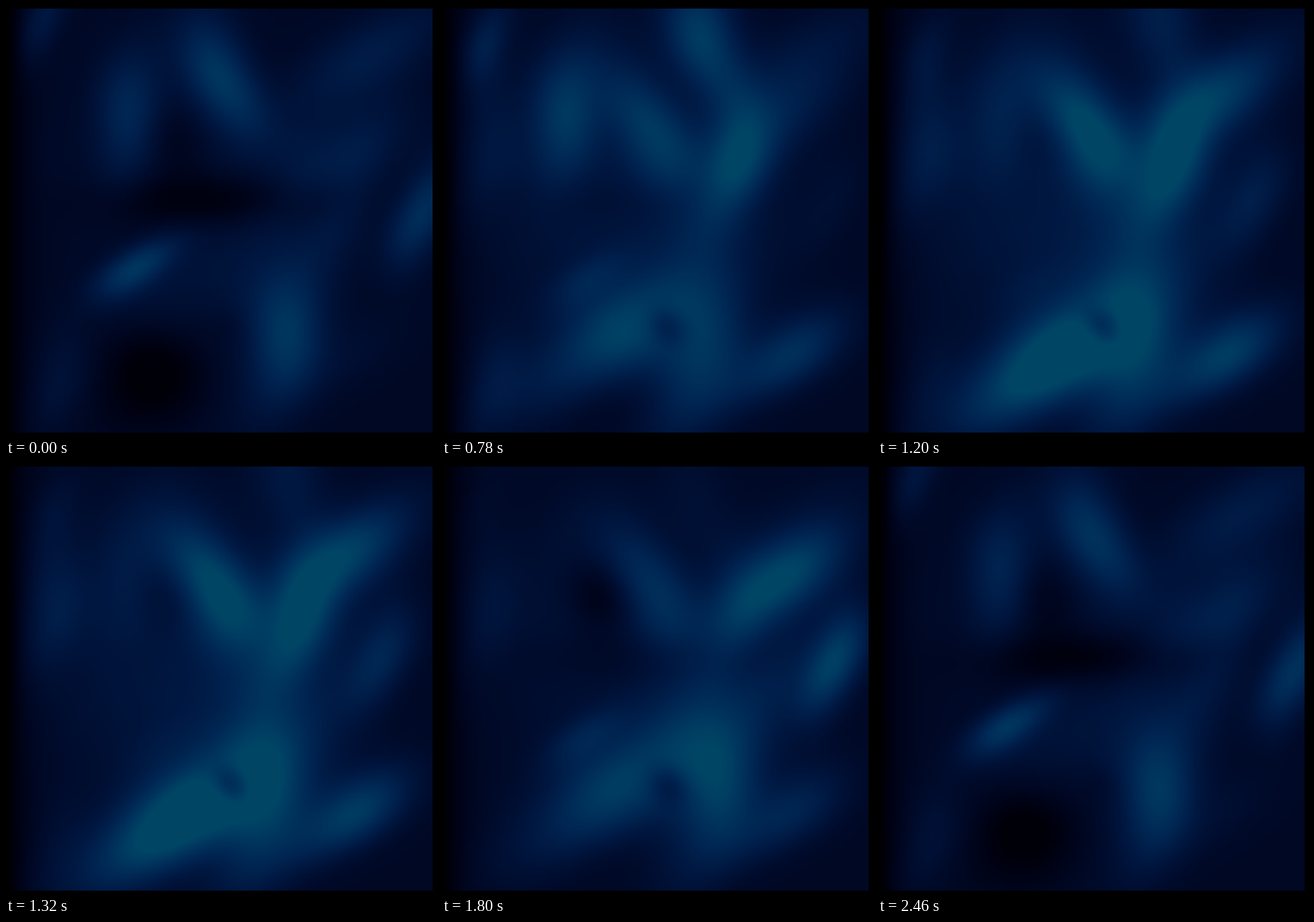
These frames come from a looping animation (500 by 500 pixels, 2520 ms). An HTML page with a canvas:

```html
<!DOCTYPE html>
<html lang="en">
<head>
<meta charset="utf-8">
<title>Deep blue drift</title>
<style>
html, body { margin: 0; width: 100%; height: 100%; overflow: hidden; background: #000; }
canvas { position: absolute; left: 4px; top: 3px; width: 492px; height: 493px; }
</style>
</head>
<body>
<canvas id="view" width="123" height="123"></canvas>
<script>
const LOOP = 2520, STEP = 60, SIZE = 123, CELL = 4;
const BASE = 0.2, REST = 0.12;
const ctx = document.getElementById('view').getContext('2d');
const image = ctx.createImageData(SIZE, SIZE);
const field = new Float32Array(SIZE * SIZE);
const lights = [];

const wave = phase => Math.cos(2 * Math.PI * phase);
const mix = (a, b, k) => a + (b - a) * k;

// Makes a family of soft ellipses that share the tilt of the long axis and the width ratio.
// Each pulses once per loop, strongest at phase `peak`, and sways by (dx, dy).
function family(tilt, ratio) {
  const a = tilt * Math.PI / 180;
  return (x, y, length, glow, peak, dx = 0, dy = 0) => lights.push({
    x, y, length, width: length * ratio, glow, peak, dx, dy,
    cos: Math.cos(a), sin: Math.sin(a)
  });
}
const rising = family(-33, 0.42);
const upright = family(-74, 0.5);
const leaning = family(65, 0.5);
const round = family(0, 1);
const flat = family(0, 0.24);

leaning(295, 48, 76, 0.76, 0.17, -38, 34);
leaning(240, 145, 86, 0.7, 0.5);

rising(430, 60, 100, 0.32, 0.08);
rising(400, 135, 86, 0.75, 0.65, 0, 30);
rising(400, 405, 78, 0.65, 0.47);
rising(170, 315, 54, 0.55, 0, -12, -10);
rising(190, 375, 112, 1, 0.5, 0, -40);

upright(52, 40, 50, 0.45, 0.18, -10, -20);
upright(143, 125, 76, 0.62, 0.18);
upright(45, 170, 78, 0.3, 0.5);
upright(335, 185, 76, 0.7, 0.42);
upright(458, 232, 64, 0.75, 0.8, 25, 8);
upright(392, 240, 74, 0.24, 0.85);
upright(325, 388, 78, 0.52, 0.92);
upright(288, 415, 95, 0.5, 0.42);
upright(50, 440, 66, 0.26, 0.2);

round(215, 225, 165, 0.26, 0.45);
round(320, 320, 72, 0.38, 0.7);

// shadows
round(180, 150, 44, -0.25, 0.75);
round(262, 372, 23, -0.45, 0.5);
round(160, 425, 58, -0.28, 0.08);
flat(240, 225, 130, -0.22, 0);

function add(l, phase) {
  const amp = l.glow * mix(REST, 1, (1 + wave(phase - l.peak)) / 2);
  const cx = l.x + l.dx * wave(phase), cy = l.y + l.dy * wave(phase);
  for (let row = 0, i = 0; row < SIZE; row++) {
    const py = 3 + (row + 0.5) * CELL, y = py - cy;
    const bend = 9 * Math.sin((py - 120) / 40);
    for (let col = 0; col < SIZE; col++, i++) {
      const x = 4 + (col + 0.5) * CELL - cx - bend;
      const u = (x * l.cos + y * l.sin) / l.length;
      const v = (y * l.cos - x * l.sin) / l.width;
      const d = u * u + v * v;
      if (d < 7) field[i] += amp * Math.exp(-d);
    }
  }
}

// Black to navy to teal; strong light levels off into a flat plateau.
function paint(level, i) {
  const v = Math.min(1, Math.max(0, level));
  image.data[i] = 0;
  image.data[i + 1] = 70 * v ** 1.35;
  image.data[i + 2] = 8 + 92 * (1 - (1 - v) ** 1.6);
  image.data[i + 3] = 255;
}

function draw(phase) {
  field.fill(BASE);
  for (const l of lights) add(l, phase);
  for (let i = 0; i < field.length; i++) {
    const edge = 1 - Math.exp(-(i % SIZE) / 5);
    paint(field[i] * edge, i * 4);
  }
  ctx.putImageData(image, 0, 0);
}

let start = null, shown = -1;
function tick(now) {
  if (start === null) start = now;
  const step = Math.floor(((now - start) % LOOP) / STEP);
  if (step !== shown) {
    shown = step;
    draw(step * STEP / LOOP);
  }
  requestAnimationFrame(tick);
}
draw(0);
requestAnimationFrame(tick);
</script>
</body>
</html>
```
